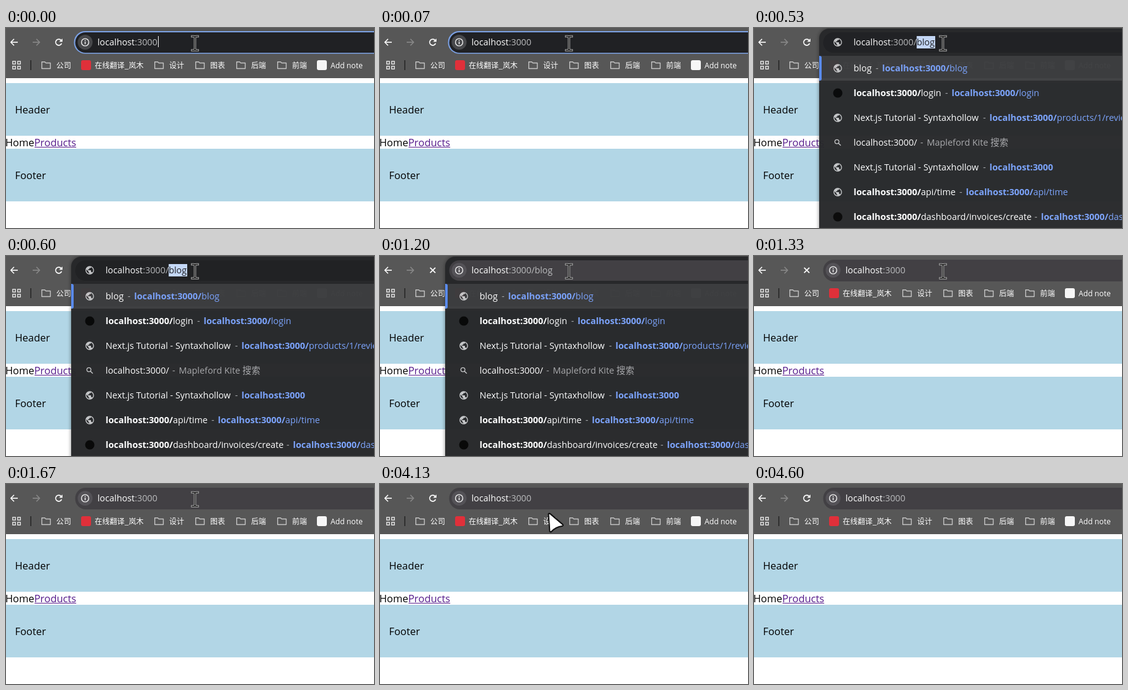
Animation, 593 px wide and 323 px high, one loop 5.07 s. Source, as an HTML page with a canvas:

```html
<!DOCTYPE html>
<html lang="en">
<head>
<meta charset="utf-8">
<title>Browser address bar</title>
<style>
html, body { margin: 0; width: 100%; height: 100%; overflow: hidden; background: #fff; }
canvas { display: block; width: 593px; height: 323px; }
</style>
</head>
<body>
<canvas id="stage"></canvas>
<script>
const W = 593, H = 323, LOOP = 5070, TICK = 200 / 3;
const ratio = window.devicePixelRatio || 1;
const UI = '"Open Sans", "Noto Sans CJK SC", "Noto Sans CJK", sans-serif';
const CJK = '"Noto Sans CJK SC", "Noto Sans CJK", sans-serif';
const PREFIX = 'localhost:3000/';
const URL_SIZE = 14.3, ROW_SIZE = 14.4, PAGE_SIZE = 16.4;
const BLUE = '#7ba3fc', WHITE = '#fff', GREY = '#a6a7aa', ICON = '#c6c7c9';

function setup(canvas) {
  canvas.width = W * ratio;
  canvas.height = H * ratio;
  const ctx = canvas.getContext('2d');
  ctx.scale(ratio, ratio);
  return ctx;
}
const stage = setup(document.getElementById('stage'));
const layer = setup(document.createElement('canvas'));

const globe = new Path2D('M12 2C6.48 2 2 6.48 2 12s4.48 10 10 10 10-4.48 10-10S17.52 2 12 2z' +
  'm-1 17.93c-3.95-.49-7-3.85-7-7.93 0-.62.08-1.21.21-1.79L9 15v1c0 1.1.9 2 2 2v1.93z' +
  'm6.9-2.54c-.26-.81-1-1.39-1.9-1.39h-1v-3c0-.55-.45-1-1-1H8v-2h2c.55 0 1-.45 1-1V7h2' +
  'c1.1 0 2-.9 2-2v-.41c2.93 1.19 5 4.06 5 7.41 0 2.08-.8 3.97-2.1 5.39z');

function box(c, x, y, w, h, color, r = 0) {
  c.fillStyle = color;
  c.beginPath();
  c.roundRect(x, y, w, h, r);
  c.fill();
}

function disc(c, x, y, r, color) {
  c.fillStyle = color;
  c.beginPath();
  c.arc(x, y, r, 0, 7);
  c.fill();
}

function line(c, points, color, width) {
  c.strokeStyle = color;
  c.lineWidth = width;
  c.beginPath();
  points.forEach(([x, y], i) => i ? c.lineTo(x, y) : c.moveTo(x, y));
  c.stroke();
}

// Returns the x where the text ends.
function text(c, str, x, y, color, size, weight = 500, family = UI) {
  c.font = `${weight} ${size}px ${family}`;
  c.fillStyle = color;
  c.fillText(str, x, y);
  return x + c.measureText(str).width;
}

function drawGlobe(c, x, y) {
  c.save();
  c.translate(x - 8.2, y - 8.2);
  c.scale(.68, .68);
  c.fillStyle = ICON;
  c.fill(globe);
  c.restore();
}

function drawPage(c) {
  box(c, 0, 0, W, H, '#fff');
  box(c, 0, 89, W, 85, '#b2d6e6');
  box(c, 0, 195, W, 85, '#b2d6e6');
  const label = (str, x, y, color = '#000') => text(c, str, x, y, color, PAGE_SIZE, 400);
  label('Header', 14.5, 138);
  label('Home', -1, 191);
  const end = label('Products', 45.5, 191, '#551a8b');
  box(c, 46, 192, end - 46, 1, '#551a8b');
  label('Footer', 14.5, 244);
}

function drawArrow(c, x, dir, color) {
  line(c, [[x - 5.5 * dir, 23], [x + 5.5 * dir, 23]], color, 1.6);
  line(c, [[x + .5 * dir, 17.8], [x + 5.7 * dir, 23], [x + .5 * dir, 28.2]], color, 1.6);
}

function drawReload(c) {
  c.strokeStyle = WHITE;
  c.lineWidth = 1.7;
  c.beginPath();
  c.arc(85, 23, 4.9, .35, 5.5);
  c.stroke();
  c.fillStyle = WHITE;
  c.beginPath();
  c.moveTo(91, 17);
  c.lineTo(91, 22.3);
  c.lineTo(85.7, 22.3);
  c.fill();
}

function drawStop(c) {
  line(c, [[80.8, 18.8], [89.2, 27.2]], WHITE, 1.7);
  line(c, [[89.2, 18.8], [80.8, 27.2]], WHITE, 1.7);
}

function drawFolder(c, x) {
  c.strokeStyle = '#c4c4c4';
  c.lineWidth = 1.4;
  c.lineJoin = 'round';
  c.beginPath();
  c.moveTo(x + .7, 54.7);
  c.lineTo(x + 5.5, 54.7);
  c.lineTo(x + 7.3, 56.5);
  c.lineTo(x + 14.5, 56.5);
  c.lineTo(x + 14.5, 65.5);
  c.lineTo(x + .7, 65.5);
  c.closePath();
  c.stroke();
}

function drawToolbar(c, loading) {
  box(c, 0, 0, W, 81, '#575757');
  drawArrow(c, 13.5, -1, WHITE);
  drawArrow(c, 48.5, 1, '#898989');
  loading ? drawStop(c) : drawReload(c);

  c.strokeStyle = '#dedede';
  c.lineWidth = 1.5;
  for (const x of [10.8, 18.8])
    for (const y of [53.8, 61.8]) c.strokeRect(x, y, 4.4, 4.4);
  box(c, 39, 52, 2, 16, '#303030');

  const label = (str, x) => text(c, str, x, 64.5, WHITE, 12, 400, CJK);
  [['公司', 57], ['设计', 239], ['图表', 305], ['后端', 371], ['前端', 437]]
    .forEach(([name, x]) => { drawFolder(c, x); label(name, x + 24); });
  box(c, 121, 52, 16, 16, '#e0303a', 3);
  label('在线翻译_岚木', 143);
  box(c, 501, 52, 16, 16, '#f6f6f6', 3);
  text(c, 'Add note', 523, 64.5, WHITE, 12.2);
}

function drawInfo(c, back) {
  disc(c, 127.5, 23, 12, back);
  c.strokeStyle = '#f0f0f0';
  c.lineWidth = 1.4;
  c.beginPath();
  c.arc(127.5, 23, 5.9, 0, 7);
  c.stroke();
  box(c, 126.8, 22, 1.5, 4.2, '#f0f0f0');
  box(c, 126.8, 19.4, 1.5, 1.6, '#f0f0f0');
}

function drawUrl(c, x, tail) {
  const end = text(c, 'localhost', x, 28, WHITE, URL_SIZE);
  return text(c, ':3000' + tail, end, 28, '#b9babc', URL_SIZE);
}

function drawBar(c, focused, open) {
  if (focused) box(c, 109.5, 5, W, 36.5, '#7ba1e4', 18);
  const inset = focused || open ? 7 : 6;
  box(c, 111.5, inset, W, 47 - 2 * inset, focused ? '#202124' : '#424044', 17);
  drawInfo(c, focused ? '#47484b' : '#545257');
  drawUrl(c, 147.5, open ? '/blog' : '');
}

// One suggestion: title, then a dash and the address starting at x.
function drawRow(c, y, icon, title, x, path) {
  if (icon === 'globe') drawGlobe(c, 135, y);
  if (icon === 'dot') disc(c, 135, y, 7.5, '#050505');
  if (icon === 'search') {
    c.strokeStyle = ICON;
    c.lineWidth = 1.3;
    c.beginPath();
    c.arc(133.6, y - 1.4, 3.3, 0, 7);
    c.stroke();
    line(c, [[136, y + 1], [139.8, y + 4.8]], ICON, 1.4);
  }
  const base = y + 5;
  let start = 160.5;
  if (icon === 'dot' || title.startsWith('api'))
    start = text(c, PREFIX, start, base, WHITE, ROW_SIZE, 700);
  text(c, title, start, base, WHITE, ROW_SIZE);
  text(c, '-', x - 10.5, base, GREY, ROW_SIZE);
  if (path === undefined) return;
  const end = text(c, path ? PREFIX : PREFIX.slice(0, -1), x, base, BLUE, ROW_SIZE, 700);
  text(c, path, end, base, BLUE, ROW_SIZE);
}

function drawDropdown(c) {
  c.clearRect(0, 0, W, H);
  c.save();
  c.shadowColor = 'rgba(0,0,0,.45)';
  c.shadowBlur = 6 * ratio;
  box(c, 105, 1, W, H + 20, '#27282a', [16, 0, 0, 0]);
  c.restore();
  box(c, 105, 45, W, 40, '#3c3d3f');
  box(c, 105, 45, 4, 40, '#5a8cf0', [0, 3, 3, 0]);

  const course = 'Next.js Tutorial - Syntaxhollow';
  drawRow(c, 65, 'globe', 'blog', 206.5, 'blog');
  drawRow(c, 105, 'dot', 'login', 318.5, 'login');
  drawRow(c, 145, 'globe', course, 379.5, 'products/1/reviews/1');
  drawRow(c, 185, 'search', PREFIX, 278.5);
  text(c, 'Mapleford Kite', 278.5, 190, GREY, ROW_SIZE, 400);
  text(c, '搜索', 381, 190, GREY, ROW_SIZE, 400, CJK);
  drawRow(c, 225, 'globe', course, 379.5, '');
  drawRow(c, 265, 'globe', 'api/time', 341.5, 'api/time');
  drawRow(c, 305, 'dot', 'dashboard/invoices/create', 462.5, 'dashboard/invoices/create');
}

function drawEditing(c) {
  box(c, 111.5, 7, W, 33, '#202124', 17);
  drawGlobe(c, 135, 23);
  const start = drawUrl(c, 160.5, '/');
  box(c, start, 13, c.measureText('blog').width + 1, 20, '#c7dbfb');
  text(c, 'blog', start, 28, '#202124', URL_SIZE);
}

function drawBeam(c) {
  const beam = (color, width) => {
    line(c, [[300, 13.5], [303, 13.5], [304.5, 15], [306, 13.5], [309, 13.5]], color, width);
    line(c, [[304.5, 14], [304.5, 35.5]], color, width);
    line(c, [[300, 36], [303, 36], [304.5, 34.5], [306, 36], [309, 36]], color, width);
  };
  c.save();
  c.lineCap = 'square';
  beam('#a9a9a9', 3.6);
  beam('#1c1c1c', 1.5);
  c.restore();
}

function drawPointer(c, x, y) {
  c.save();
  c.translate(x, y);
  c.lineJoin = 'round';
  c.beginPath();
  c.moveTo(1, 2);
  c.lineTo(21.5, 19.5);
  c.quadraticCurveTo(11, 20.5, 3, 29);
  c.closePath();
  c.strokeStyle = '#111';
  c.lineWidth = 5;
  c.stroke();
  c.strokeStyle = c.fillStyle = '#fff';
  c.lineWidth = 1;
  c.fill();
  c.stroke();
  c.restore();
}

function draw(t) {
  const c = stage;
  const open = t >= 530 && t < 1330;
  drawPage(c);
  drawToolbar(c, t >= 1200 && t < 1670);

  if (open) {
    drawDropdown(layer);
    if (t < 1200) drawEditing(layer);
    c.globalAlpha = t < 600 ? .97 : t < 1270 ? .98 : .14;
    c.drawImage(layer.canvas, 0, 0, W, H);
    c.globalAlpha = 1;
  }
  if (!open || t >= 1200) drawBar(c, t < 530, open);
  if (t < 70) box(c, 245, 13, 1, 18, '#f4f4f4');

  if (t < 4130) {
    drawBeam(c);
  } else if (t < 4600) {
    const p = (Math.floor((t + 4) / TICK) - 62) / 6;
    drawPointer(c, 272 - 149 * p, 47 + 258 * p);
  }
}

function tick(now) {
  draw(now % LOOP);
  requestAnimationFrame(tick);
}
draw(0);
requestAnimationFrame(tick);
</script>
</body>
</html>
```
